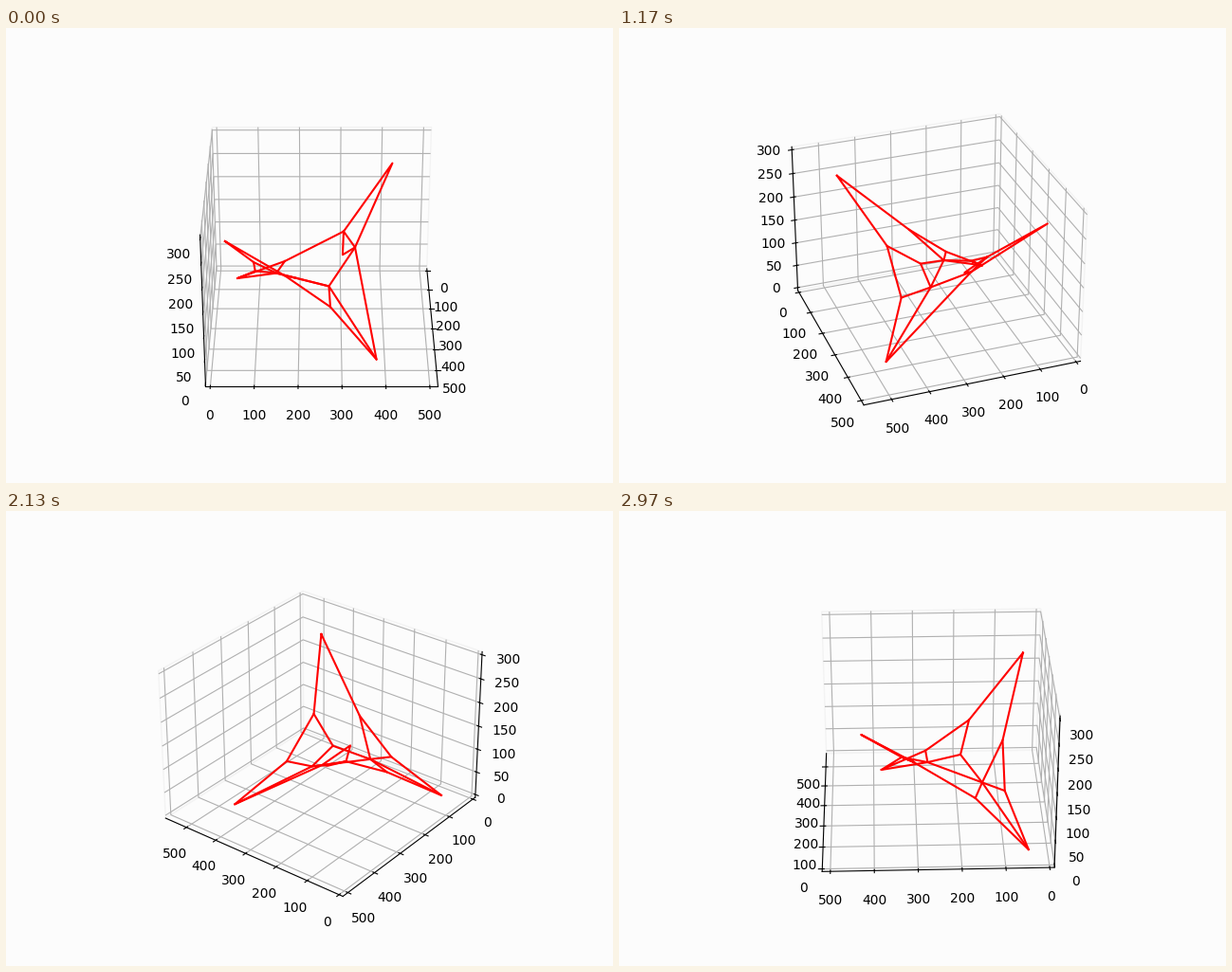
Animation of 640 by 480 pixels, one loop 3000 ms. Source, as a matplotlib script:

```python
import matplotlib.pyplot as plt
from matplotlib.animation import FuncAnimation

FRAMES = 100
INTERVAL = 30
PAPER = "#fcfcfc"
PANE_EDGE = "#f3f3f3"

POINTS = {
    # spike tips
    "A": (47.6, 424.0, 251.0),
    "B": (463.3, 380.8, 0.8),
    "C": (467.7, 37.7, 251.0),
    "D": (56.9, 44.0, 0.8),
    # body
    "E": (157.9, 306.3, 146.7),
    "F": (212.7, 333.0, 134.4),
    "G": (218.6, 303.6, 120.7),
    "H": (298.6, 270.7, 86.2),
    "I": (380.7, 273.8, 77.1),
    "J": (141.9, 164.1, 75.0),
    "K": (211.7, 144.9, 77.8),
    "L": (184.6, 93.3, 71.0),
    "M": (290.3, 93.8, 134.6),
    "N": (295.9, 192.8, 102.9),
    "P": (379.9, 169.4, 143.0),
}

# outer outline first, then the inner struts
CHAINS = ["CMLDJEAFBIPC", "EGFE", "BHF", "IHNP", "HK", "NKM", "LKJ", "DK"]

fig = plt.figure(figsize=(6.4, 4.8), dpi=100, facecolor=PAPER)
ax = fig.add_subplot(projection="3d", facecolor=PAPER)

for chain in CHAINS:
    xs, ys, zs = zip(*(POINTS[name] for name in chain))
    ax.plot(xs, ys, zs, color="red", linewidth=1.5)

ax.set_xlim(-11.7, 572.7, view_margin=0)
ax.set_ylim(-10.6, 518.6, view_margin=0)
ax.set_zlim(-6.25, 306.25, view_margin=0)

for axis in (ax.xaxis, ax.yaxis, ax.zaxis):
    axis.pane.set(facecolor=PAPER, edgecolor=PANE_EDGE, alpha=1)


def turn(i):
    """Half a turn around the vertical axis per loop."""
    ax.view_init(elev=30, azim=180 * i / FRAMES)
    return []


anim = FuncAnimation(fig, turn, frames=FRAMES, init_func=lambda: turn(0),
                     interval=INTERVAL, repeat=True, repeat_delay=0, blit=False)
plt.show()
```
